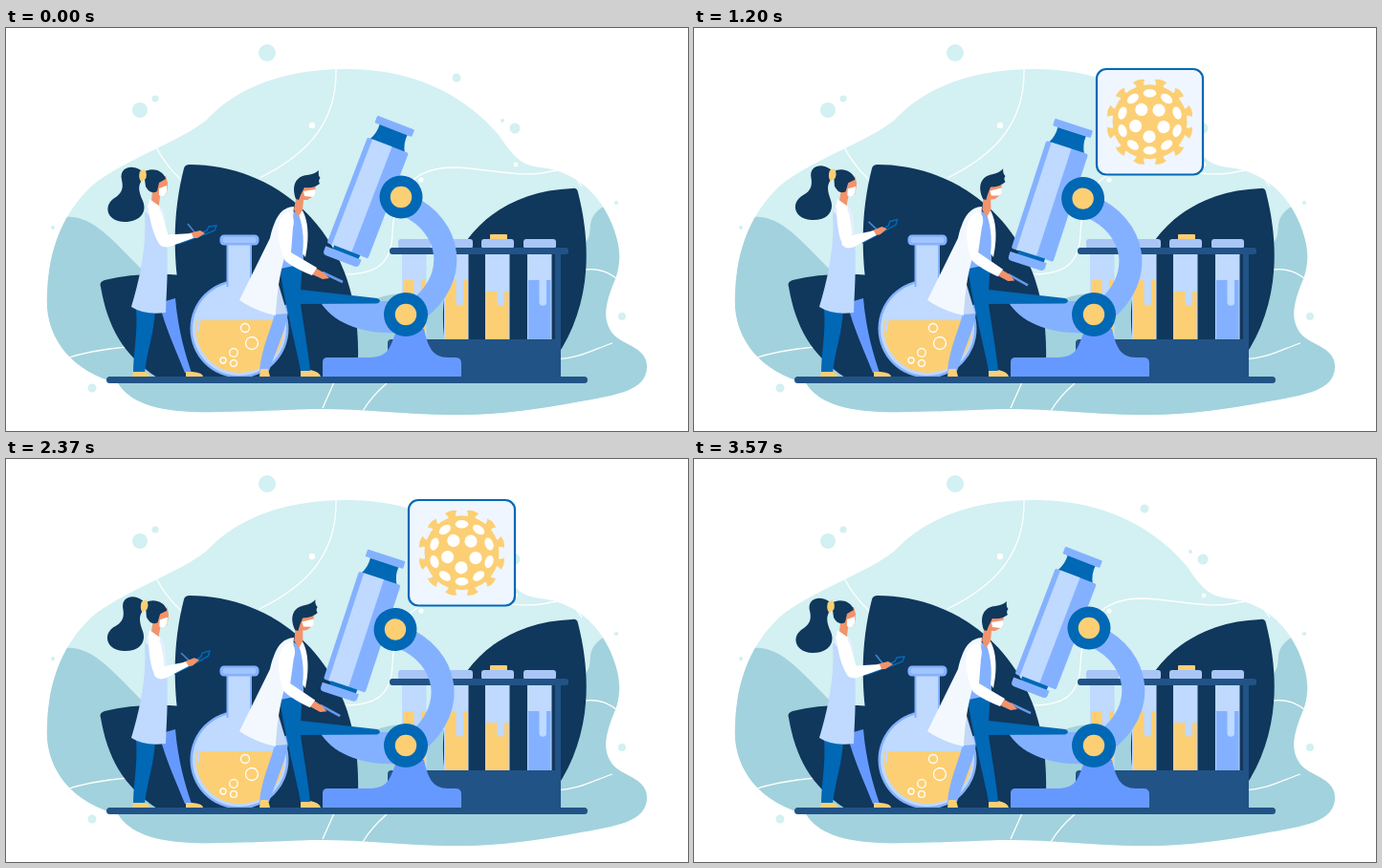
Animation, 713 px wide and 422 px high, one loop 3.6 s. Source, as an HTML page:

```html
<!DOCTYPE html>
<html lang="en">
<head>
<meta charset="utf-8">
<title>Laboratory</title>
<style>
  html, body { margin: 0; width: 100%; height: 100%; overflow: hidden; background: #fff; }
  svg { display: block; width: 713px; height: 422px; }
  .pale { fill: #d3f0f2; } .teal { fill: #a2d2dd; } .navy { fill: #10375c; } .table { fill: #215387; }
  .blue { fill: #0068b5; } .mid { fill: #84b1ff; } .light { fill: #bfd9ff; } .peri { fill: #6699ff; }
  .gold { fill: #fccf74; } .skin { fill: #f2936b; } .white { fill: #fff; } .coat { fill: #f3f8ff; }
  .line { fill: none; stroke: #fff; stroke-width: 1.3; }
</style>
</head>
<body>
<svg viewBox="0 0 713 422">
  <defs>
    <path id="blob" d="M43 280C44 235 58 195 90 165C125 137 180 120 210 96C245 58 300 42 360 43C430 44 481 72 515 112C530 134 538 144 559 146C594 150 619 172 632 202C645 232 643 250 634 270C625 294 624 308 636 322C648 333 670 335 670 355C669 380 640 384 595 392C552 400 510 406 460 405C410 404 370 398 320 399C280 400 240 403 195 402C155 400 130 392 117 372C70 360 40 325 43 280Z"/>
    <clipPath id="inBlob"><use href="#blob"/></clipPath>
    <clipPath id="inFlask"><circle cx="244.500" cy="315" r="46"/></clipPath>
  </defs>

  <g id="dots" class="pale"></g>
  <use href="#blob" class="pale"/>
  <g clip-path="url(#inBlob)">
    <path class="teal" d="M30 205C45 197 60 197 70 198C105 202 130 250 180 285L340 330C360 285 400 270 450 282L590 300V232C612 228 610 215 611 206C612 196 620 189 628 185L713 185V422H0V205Z"/>
    <path class="line" d="M345 43C346 95 320 130 265 157M157 125Q167 144 184 160M66 345Q95 336 140 333M340 258C385 260 403 250 404 215C406 165 430 146 468 146C505 147 540 158 570 150C585 147 594 153 602 166M606 253Q625 251 639 263M575 347C600 346 615 336 634 330M331 398L343 371M373 401Q382 386 398 372"/>
  </g>
  <g id="specks" class="white"></g>

  <path class="navy" d="M99 271Q97 266 103 264Q140 255 185 259L230 366H158C122 342 106 312 99 271Z"/>
  <path class="navy" d="M186 147Q187 143 192 143C280 143 380 212 367 366H205C172 280 171 205 186 147Z"/>
  <path class="navy" d="M592 168Q597 167 598 172C614 235 609 295 575 345H462C440 255 490 172 592 168Z"/>

  <g id="tubes"></g>
  <path class="table" d="M399 330Q399 326 403 326H574V236H580V366H399Z"/>
  <rect class="table" x="401" y="230" width="187" height="7" rx="3"/>

  <path class="mid" d="M328 286H405L410 319C372 321 342 309 328 286Z"/>
  <g id="scope">
    <path d="M420 186C466 208 475 262 429 296" fill="none" stroke="#84b1ff" stroke-width="24"/>
    <g transform="translate(400 124) rotate(21)">
      <rect class="mid" x="-22.500" y="-26" width="41.500" height="8" rx="1"/>
      <path class="blue" d="M-17-18H14Q13-9 18 0H-21Q-16-9-17-18Z"/>
      <rect class="mid" x="-24" y="-1" width="46" height="118.500" rx="2"/>
      <rect class="light" x="-18.500" y="-1" width="22" height="118.500"/>
      <rect class="blue" x="-16" y="117" width="29" height="5"/>
      <path class="mid" d="M-24 121H16V126Q16 130 12 130H-20Q-24 130-24 126Z"/>
    </g>
    <circle class="blue" cx="413" cy="177" r="22.500"/>
    <circle class="gold" cx="413" cy="177" r="11.200"/>
  </g>
  <path class="peri" d="M331 366V350Q331 345 336 345H380C402 345 402 331 409 315H437C441 334 446 345 462 345H470Q476 345 476 351V366Z"/>
  <circle class="blue" cx="418" cy="300" r="23"/>
  <circle class="gold" cx="418" cy="300" r="11.200"/>

  <circle class="mid" cx="244" cy="315" r="51.500"/>
  <circle class="light" cx="244" cy="315" r="49"/>
  <rect class="mid" x="230.500" y="226" width="26.500" height="45"/>
  <rect class="light" x="232.500" y="226" width="22.500" height="48"/>
  <rect class="mid" x="223.500" y="216.500" width="41" height="11" rx="4.500"/>
  <rect x="226.500" y="219" width="35" height="6" rx="3" fill="#a3c5ff"/>
  <rect class="gold" clip-path="url(#inFlask)" x="190" y="306" width="110" height="60"/>
  <path d="M204 303Q200 309 201 318" class="line" style="stroke:#bfd9ff;stroke-width:2.5"/>
  <g id="bubbles" class="line"></g>

  <!-- Man -->
  <path class="mid" d="M282 295L296 288C295 312 283 335 275 359H265C267 334 278 314 282 295Z"/>
  <path class="gold" d="M266 357H274L276 365H265ZM308 358H318Q328 360 329 365H308Z"/>
  <path class="blue" d="M286 249L310 246L308 274L388 283Q394 285.500 388 288.500L308 289C311 312 316 337 318 359H308C304 335 291 290 286 249Z"/>
  <path d="M283 262L294 299L282 300Z" fill="#c2d8f5"/>
  <path class="mid" d="M299 191L311 198V247L287 252Z"/>
  <path class="coat" d="M301 187C287 188 281 199 276 220L244 285Q262 297 282 301C283 278 287 245 298 222Z"/>
  <path class="white" d="M308 188C317 200 317 222 313 240L310 236C312 220 310 204 304 190Z"/>
  <g id="manHead">
    <path class="skin" d="M304 174L309 164L324 165L322 176L315 180L311 180L310 191L305 198L301 190Z"/>
    <path class="navy" d="M303 179C298 165 303 155 315 154Q323 153 327 149Q326 154 328.500 157Q326 160 328 163Q322 168 312 167L308 175L306 180Z"/>
    <path class="white" d="M311 171L323 169Q324 174 321 177L312 176Z"/>
  </g>
  <g id="manArm">
    <path d="M331 256L352 266" fill="none" stroke="#6b98e8" stroke-width="2.500"/>
    <path class="skin" d="M321 250L332 256L338 262L331 263L318 257Z"/>
    <path class="white" d="M286 202C293 187 304 193 300 209L298 235L325 251L320 259Q302 252 292 244C287 234 282 214 286 202Z"/>
  </g>

  <!-- Woman -->
  <path class="blue" d="M136 294H156C155 320 148 335 145 361H133C133 340 138 320 136 294Z"/>
  <path class="peri" d="M160 288L177 283C180 317 187 340 194 361H187C177 336 167 315 160 288Z"/>
  <path class="gold" d="M133 360H145Q150 361 150 365H132ZM188 360H195Q206 361 206 365H188Z"/>
  <path class="light" d="M147 184L163 187C172 220 168 270 167 298Q145 301 131 292C141 258 147 228 145 196Z"/>
  <path d="M147 184L163 187Q168 198 168 218L146 192Z" fill="#e3efff"/>
  <g id="womanHead">
    <path class="skin" d="M156 155L167 155L169 162L168 173L161 176L160 186L152 182L153 170Z"/>
    <path class="navy" d="M144 151C151 146 164 148 167 158L160 162L158 171Q151 175 146 166ZM141 149C130 142 118 147 121 159C124 171 118 175 112 179C101 188 107 203 124 203C140 203 148 193 143 181C139 172 137 165 143 158Z"/>
    <path class="gold" d="M140 150L145 148Q148 153 146 158L141 161Q138 156 140 150Z"/>
    <path class="white" d="M160 168L168 165L168 172Q164 178 160 175Z"/>
  </g>
  <path class="white" d="M150 179L161 187L160 192L148 188Z"/>
  <g id="womanArm">
    <g id="forearm">
      <path class="navy" d="M180 226L210 212L212 208L220 207L218 212L208 216Z" stroke="#0068b5" stroke-width="1.500"/>
      <path d="M190 205L198 215" stroke="#4385cf" stroke-width="1.600"/>
      <path class="skin" d="M191 215L203 212L208 215L200 220L192 220Z"/>
      <path class="white" d="M161 217L194 215L196 220L171 229Q162 231 159 224Z"/>
    </g>
    <path class="white" d="M149 188Q158 183 163 194L171 222Q168 231 162 228C155 221 150 201 149 188Z"/>
  </g>

  <rect class="table" x="105" y="365" width="503" height="7" rx="3.500"/>

  <g id="card">
    <rect x="-55.500" y="-55.300" width="111" height="110.500" rx="10" fill="#eff6ff" stroke="#0068b5" stroke-width="2.200"/>
    <circle class="gold" r="39"/>
    <g id="spikes" class="gold"></g>
    <g id="spots" class="white"></g>
  </g>
</svg>

<script>
const $ = id => document.getElementById(id);
const fill = (id, items, draw) => { $(id).innerHTML = items.map(draw).join(''); };
const circle = ([x, y, r]) => `<circle cx="${x}" cy="${y}" r="${r}"/>`;
const range = n => [...Array(n).keys()];

fill('dots', [[273, 26, 9], [140, 86, 8], [156, 74, 3.5], [471, 52, 4.5], [532, 105, 5.5],
  [519, 97, 2], [638, 183, 2], [644, 302, 4], [90, 377, 4.5], [49, 209, 2]], circle);
fill('specks', [[320, 102, 3.2], [434, 159, 2.6], [533, 143, 2.4]], circle);
fill('bubbles', [[250, 314, 4.5], [257, 330, 6.5], [238, 340, 4.3], [238, 351, 3.4], [227, 348, 3]], circle);

fill('tubes', [[414, 264, 'gold'], [458, 264, 'gold'], [501, 276, 'gold'], [545, 264, 'mid']], ([x, level, colour], i) => `
  ${i === 2 ? '<rect class="gold" x="506" y="216" width="18" height="9" rx="1"/>' : ''}
  <rect x="${x - 4}" y="221" width="34" height="10" rx="3" fill="#a9c6f7"/>
  <rect class="light" x="${x}" y="231" width="25.500" height="95"/>
  <rect class="${colour}" x="${x + 1}" y="${level}" width="23.500" height="62"/>
  <path class="light" d="M${x + 12.5} 262H${x + 20}V287a3.750 3.750 0 0 1-7.500 0Z"/>`);

fill('spikes', range(12), i =>
  `<path transform="rotate(${15 + 30 * i})" d="M-4-36Q-3-41-6.500-44Q0-47 6.500-44Q3-41 4-36Z"/>`);
fill('spots', range(15), i => i < 10
  ? `<ellipse transform="rotate(${36 * i})" cy="-30" rx="6.800" ry="4.300"/>`
  : `<circle transform="rotate(${72 * i - 34})" cy="-15.500" r="6.600"/>`);

const LOOP = 3600, SWAY = 1800;
const joints = [
  ['scope', -4, 440, 300],
  ['womanHead', 5, 155, 180],
  ['womanArm', 10, 153, 190],
  ['forearm', -21, 165, 224],
  ['manHead', -7.5, 306, 187],
  ['manArm', 5, 299, 222],
];
const ease = (t, start, length) => {
  const p = Math.min(1, Math.max(0, (t - start) / length));
  return p * p * (3 - 2 * p);
};

function render(now) {
  const t = now % LOOP;
  const sway = (1 - Math.cos(t / SWAY * 2 * Math.PI)) / 2;
  for (const [id, angle, x, y] of joints)
    $(id).setAttribute('transform', `rotate(${angle * sway} ${x} ${y})`);
  const size = ease(t, 750, 400) - ease(t, 3240, 320);
  $('card').setAttribute('transform', `translate(476.500 98.300) scale(${size})`);
  requestAnimationFrame(() => render(performance.now()));
}
render(performance.now());
</script>
</body>
</html>
```
